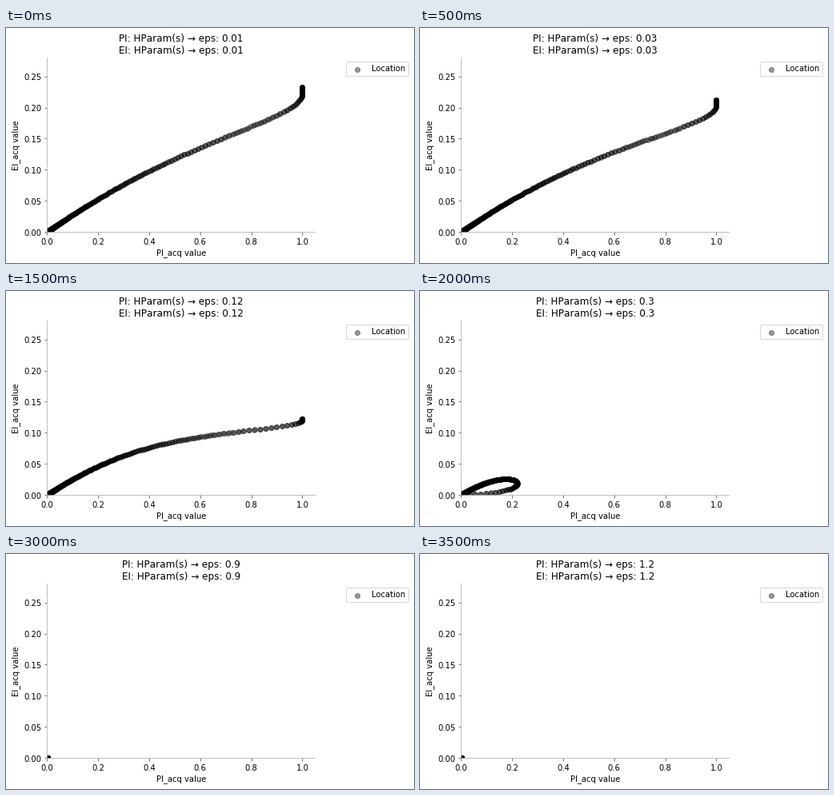
A matplotlib script for the animation above (4000 ms loop, 510 by 294 pixels).

```python
import math

import numpy as np
import matplotlib.pyplot as plt
from matplotlib.animation import FuncAnimation
from matplotlib.transforms import ScaledTranslation

W, H, DPI = 510, 294, 72
AX_LEFT, AX_TOP, AX_W, AX_H = 51.45, 37.45, 334.8, 217.44
TEXT_DROP = 0.65  # text sits slightly lower than the lines, in pixels
EPSILONS = [0.01, 0.03, 0.06, 0.12, 0.3, 0.6, 0.9, 1.2]

plt.rcParams["text.kerning_factor"] = 6

# Posterior around one dominant observation: mean gain and spread
PEAK, GAIN, VAR, NOISE = 4.75, 0.2425, 0.9025, 0.0004
steps = np.arange(450)
places = np.concatenate([-0.00445 * (steps + 0.4), 0.00459 * steps])
corr = np.exp(-places ** 2)
gain = GAIN - PEAK * (1 - corr)
sigma = np.sqrt(VAR * (1 - corr ** 2) + NOISE)

erf = np.vectorize(math.erf)


def acquisition(eps):
    """Probability of improvement and expected improvement per location."""
    z = (gain - eps) / sigma
    cdf = 0.5 * (1 + erf(z / math.sqrt(2)))
    pdf = np.exp(-z ** 2 / 2) / math.sqrt(2 * math.pi)
    return np.column_stack([cdf, sigma * (z * cdf + pdf)])


fig = plt.figure(figsize=((W + 0.01) / DPI, (H + 0.01) / DPI), dpi=DPI,
                 facecolor="white")
ax = fig.add_axes([AX_LEFT / W, 1 - (AX_TOP + AX_H) / H, AX_W / W, AX_H / H])
ax.set_xlim(0, 1.05)
ax.set_ylim(0, 0.28)
ax.set_xticks(np.arange(0, 1.01, 0.2))
ax.set_yticks(np.arange(0, 0.26, 0.05))
ax.tick_params(color="#555555")
ax.set_xlabel("PI_acq value")
ax.set_ylabel("EI_acq value", y=0.5 - TEXT_DROP / AX_H)
for side in ("top", "right"):
    ax.spines[side].set_visible(False)
for side in ("left", "bottom"):
    ax.spines[side].set_color("#b0b0b0")

drop = ScaledTranslation(0, -TEXT_DROP / DPI, fig.dpi_scale_trans)
for label in ax.get_xticklabels() + ax.get_yticklabels():
    label.set_transform(label.get_transform() + drop)

start = acquisition(EPSILONS[0])
dots = ax.scatter(start[:, 0], start[:, 1], s=36, color="black", alpha=0.4,
                  label="Location")
ax.legend(bbox_to_anchor=(1.1, 1), loc="upper left")
title = ax.set_title("", fontsize=12, pad=6 - TEXT_DROP)


def update(i):
    eps = EPSILONS[i]
    dots.set_offsets(acquisition(eps))
    title.set_text("\n".join(f"{name}: HParam(s) → eps: {eps}"
                             for name in ("PI", "EI")))
    return dots, title


anim = FuncAnimation(fig, update, frames=len(EPSILONS), interval=500,
                     repeat=True, repeat_delay=0)
plt.show()
```
